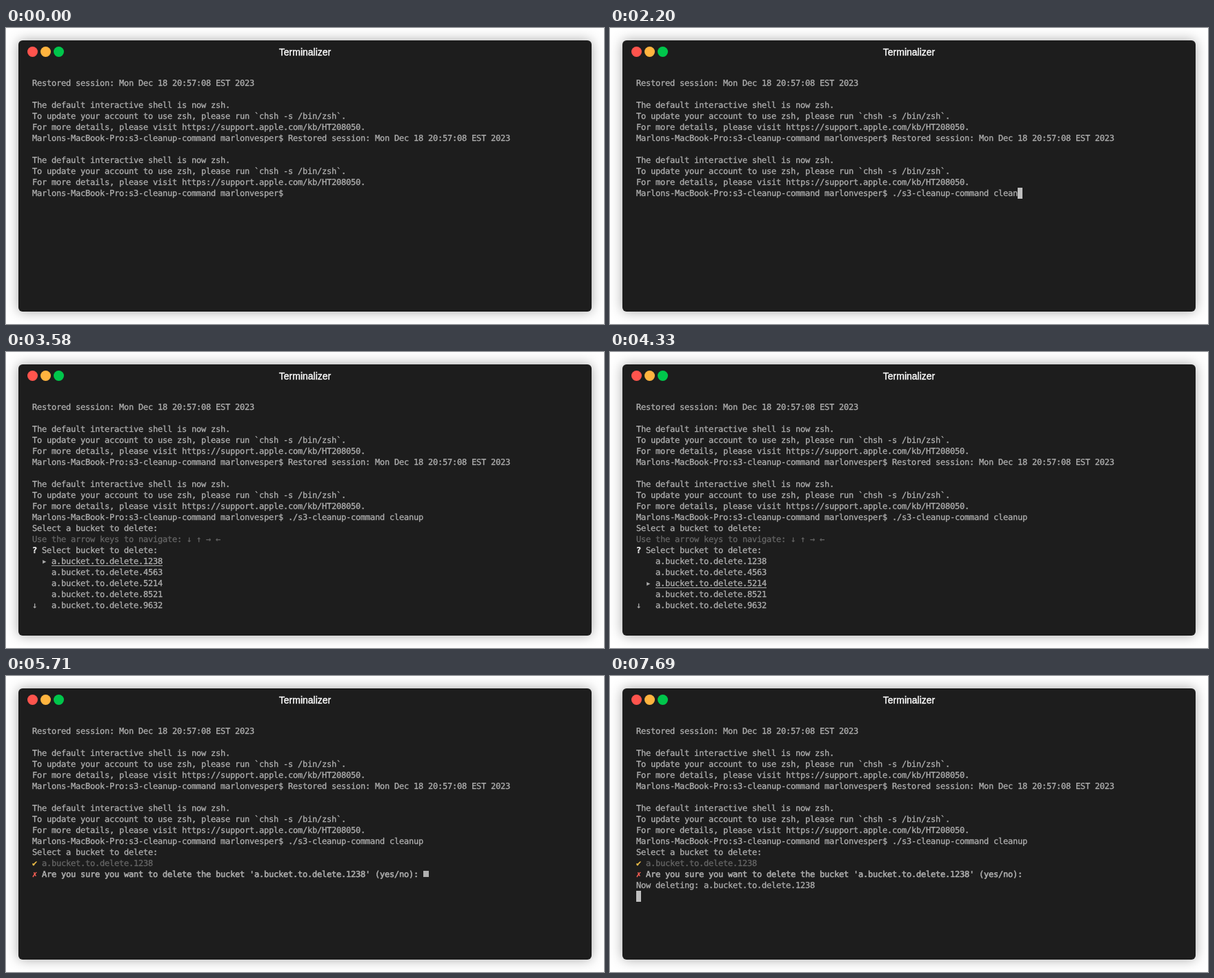
An HTML page for the animation above (8000 ms loop, 867 by 430 pixels).

```html
<!DOCTYPE html>
<html lang="en">
<head>
<meta charset="utf-8">
<title>Terminal session</title>
<style>
  html, body { margin: 0; width: 100%; height: 100%; overflow: hidden; background: #fff; }
  #window {
    position: absolute; left: 18px; top: 18px; width: 831px; height: 394px;
    border-radius: 6px; background: #1d1d1d; box-shadow: 0 0 18px rgba(0, 0, 0, .35);
  }
  #title {
    position: absolute; left: 0; right: 0; top: 9px; text-align: center;
    font: 14px/16px "Liberation Sans", Arial, sans-serif; color: #fff;
    -webkit-text-stroke: .4px;
  }
  .button { position: absolute; top: 9px; width: 15px; height: 15px; border-radius: 50%; }
  #screen {
    position: absolute; left: 20px; top: 54px; color: #afafaf; white-space: pre;
    font: 12px/16px "DejaVu Sans Mono", monospace; letter-spacing: calc(7px - 1ch);
    text-rendering: geometricPrecision; -webkit-text-stroke: .3px;
  }
  #screen div { height: 16px; }
  #screen b { color: #f0f0f0; }
  #screen u { text-decoration: none; box-shadow: inset 0 -1px #afafaf; }
  .faint { color: #666; }
  .strong { -webkit-text-stroke: .55px; }
  .yes { color: #f5c04a; }
  .no { color: #ff6257; }
  .cursor { position: absolute; width: 7px; height: 16px; background: #bfbfbf; }
  .block { display: inline-block; width: 8px; height: 9px; background: #afafaf; }
</style>
</head>
<body>
<div id="window">
  <span class="button" style="left:13px;background:#ff544d"></span>
  <span class="button" style="left:32px;background:#ffb43f"></span>
  <span class="button" style="left:51px;background:#00c64b"></span>
  <div id="title">Terminalizer</div>
  <div id="screen"></div>
</div>
<script>
const LOOP = 8000;
const prompt = 'Marlons-MacBook-Pro:s3-cleanup-command marlonvesper$ ';
const greeting = [
  'Restored session: Mon Dec 18 20:57:08 EST 2023',
  '',
  'The default interactive shell is now zsh.',
  'To update your account to use zsh, please run `chsh -s /bin/zsh`.',
  'For more details, please visit https://support.apple.com/kb/HT208050.'
];
const header = [...greeting, prompt + greeting[0], ...greeting.slice(1)];
const buckets = [1238, 4563, 5214, 8521, 9632].map(n => 'a.bucket.to.delete.' + n);

const command = './s3-cleanup-command cleanup';
// [time, characters on the command line]; the jump to 21 is a tab completion
const commandKeys = [[500, 1], [590, 2], [780, 3], [1020, 21], [1900, 22], [1975, 23],
  [2050, 24], [2125, 25], [2200, 26], [2390, 27], [2620, 28]];
const selectionKeys = [[4130, 1], [4330, 2], [4830, 1], [4990, 0]];
const answerKeys = [[6750, 1], [6850, 2], [6940, 3]];

const valueAt = (keys, t) => keys.reduce((value, [time, next]) => t >= time ? next : value, 0);
const span = (name, text) => `<span class="${name}">${text}</span>`;
const cursor = (column, row) =>
  `<span class="cursor" style="left:${column * 7}px;top:${row * 16}px"></span>`;

function menu(selected) {
  return [
    span('faint', 'Use the arrow keys to navigate: ↓ ↑ → ←'),
    '<b>?</b> Select bucket to delete:',
    ...buckets.map((name, i) => (i === buckets.length - 1 ? '↓ ' : '  ') +
      (i === selected ? `▸ <u>${name}</u>` : '  ' + name))
  ];
}

function confirmation(t) {
  const question = `Are you sure you want to delete the bucket '${buckets[0]}' (yes/no): `;
  const answer = t < 7600 ? 'yes'.slice(0, valueAt(answerKeys, t)) + span('block', '') : '';
  return [
    span('yes', '✔') + ' ' + span('faint', buckets[0]),
    span('no', '✗') + ' ' + span('strong', question) + answer
  ];
}

function screenAt(t) {
  const typed = valueAt(commandKeys, t);
  const lines = [...header, prompt + command.slice(0, typed)];
  let caret = '';

  if (t >= 3480) lines.push('Select a bucket to delete:');
  if (t >= 5710) lines.push(...confirmation(t));
  else if (t >= 3580) lines.push(...menu(valueAt(selectionKeys, t)));
  if (t >= 7690) lines.push('Now deleting: ' + buckets[0]);

  if (t >= 500 && t < 2990) caret = cursor(prompt.length + typed, lines.length - 1);
  else if (t >= 2990 && t < 3580 || t >= 7600) caret = cursor(0, lines.length);

  return lines.map(line => `<div>${line}</div>`).join('') + caret;
}

const screenElement = document.getElementById('screen');
let shown = '';
function draw() {
  const html = screenAt(performance.now() % LOOP);
  if (html !== shown) screenElement.innerHTML = shown = html;
  requestAnimationFrame(draw);
}
draw();
</script>
</body>
</html>
```
